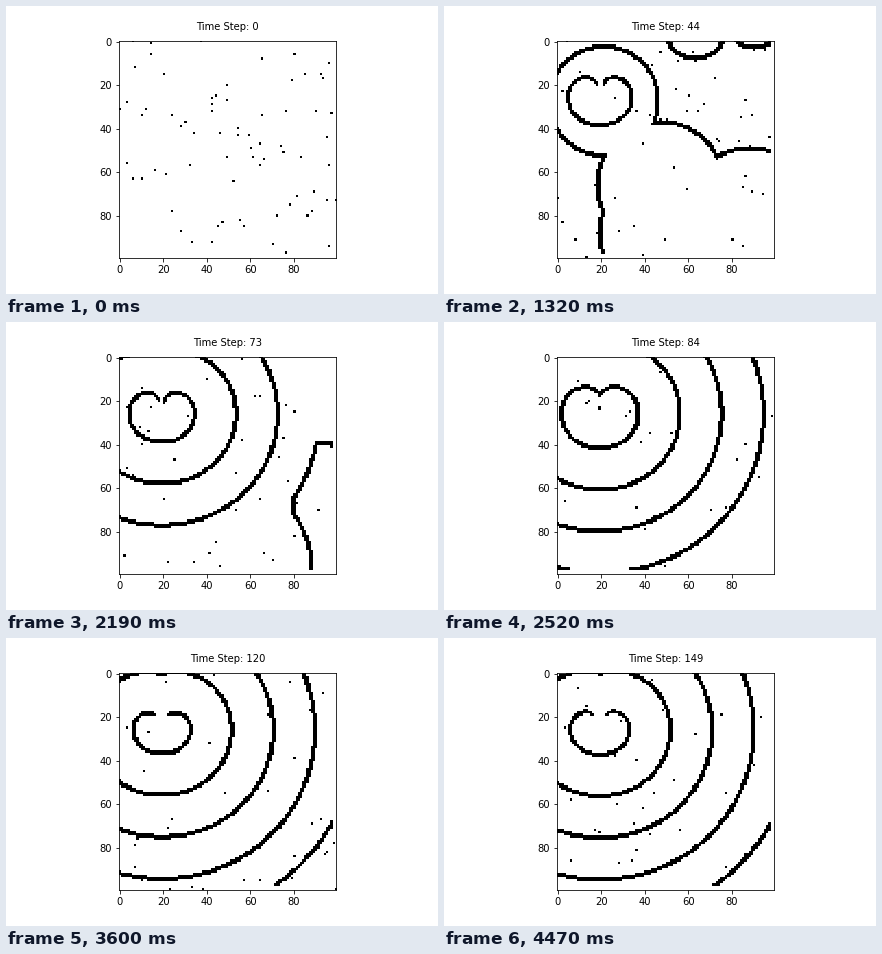
A matplotlib script that plays this animation: 432x288 px, repeating every 4.5 s.

```python
import numpy as np
import matplotlib.pyplot as plt
from matplotlib.animation import FuncAnimation

N = 100             # cells per side
STEPS = 150
SPEED = 2           # cells a front travels per step
WAVELENGTH = 19.2   # cells between two spiral turns
SPIRAL_START = 36.4
Y, X = np.mgrid[:N, :N]


def seeds(*points):
    """Arrival step of the first circular wave from any (x, y, birth)."""
    return np.min([birth + np.hypot(X - x, Y - y) / SPEED
                   for x, y, birth in points], axis=0)


def spiral_pair(mid_x, mid_y, half_gap, core):
    """Arrival step of the first turn of two mirrored spirals."""
    out, down = np.abs(X - mid_x) - half_gap, Y - mid_y
    radius = np.hypot(out, down)
    angle = np.arctan2(out, down)   # 0 is down, pi is up
    angle = (angle + np.pi / 2) % (2 * np.pi) - np.pi / 2
    path = radius + WAVELENGTH * angle / (2 * np.pi)
    path[radius < core] = np.inf
    return SPIRAL_START + path / SPEED


def arrivals():
    """Arrival steps for every wave that crosses the sheet."""
    opening = seeds((21, 27.5, 31.5), (47, 66, 29.5), (88, 78, 29.5),
                    (48, 88, 29.5), (63, -6, 37), (90, -10, 37.5))
    echoes = seeds((43, 98, 50.5), (97, -10, 48), (45, 67, 55.5))
    turn = spiral_pair(mid_x=19.2, mid_y=23, half_gap=3.8, core=3.5)
    period = WAVELENGTH / SPEED
    count = int((STEPS - SPIRAL_START) / period) + 2
    later = [turn + n * period for n in range(1, count)]
    return np.array([opening, np.minimum(turn, echoes), *later])


ARRIVALS = arrivals()


def state(step):
    fronts = (np.abs(step - ARRIVALS) * SPEED <= 1).any(axis=0)
    fronts[98:] = False
    fronts[:, 98:] = False
    rate = 0.003 + 0.0045 * np.exp(-step / 10)
    sparks = np.random.default_rng([7, step]).random((N, N)) < rate
    return (fronts | sparks).astype(float)


plt.rcParams.update({"font.family": "DejaVu Sans", "font.size": 10})
fig, ax = plt.subplots(figsize=(6, 4), dpi=72)
fig.subplots_adjust(left=0.125, right=0.9, bottom=0.125, top=0.88)
image = ax.imshow(state(0), cmap="gray_r", vmin=0, vmax=1,
                  interpolation="nearest")
title = ax.text(0.5, 1.05, "Time Step: 0", ha="center",
                transform=ax.transAxes)


def draw(step):
    image.set_data(state(step))
    title.set_text(f"Time Step: {step}")
    return image, title


anim = FuncAnimation(fig, draw, frames=STEPS, init_func=lambda: draw(0),
                     interval=30, repeat=True, repeat_delay=0)
plt.show()
```
